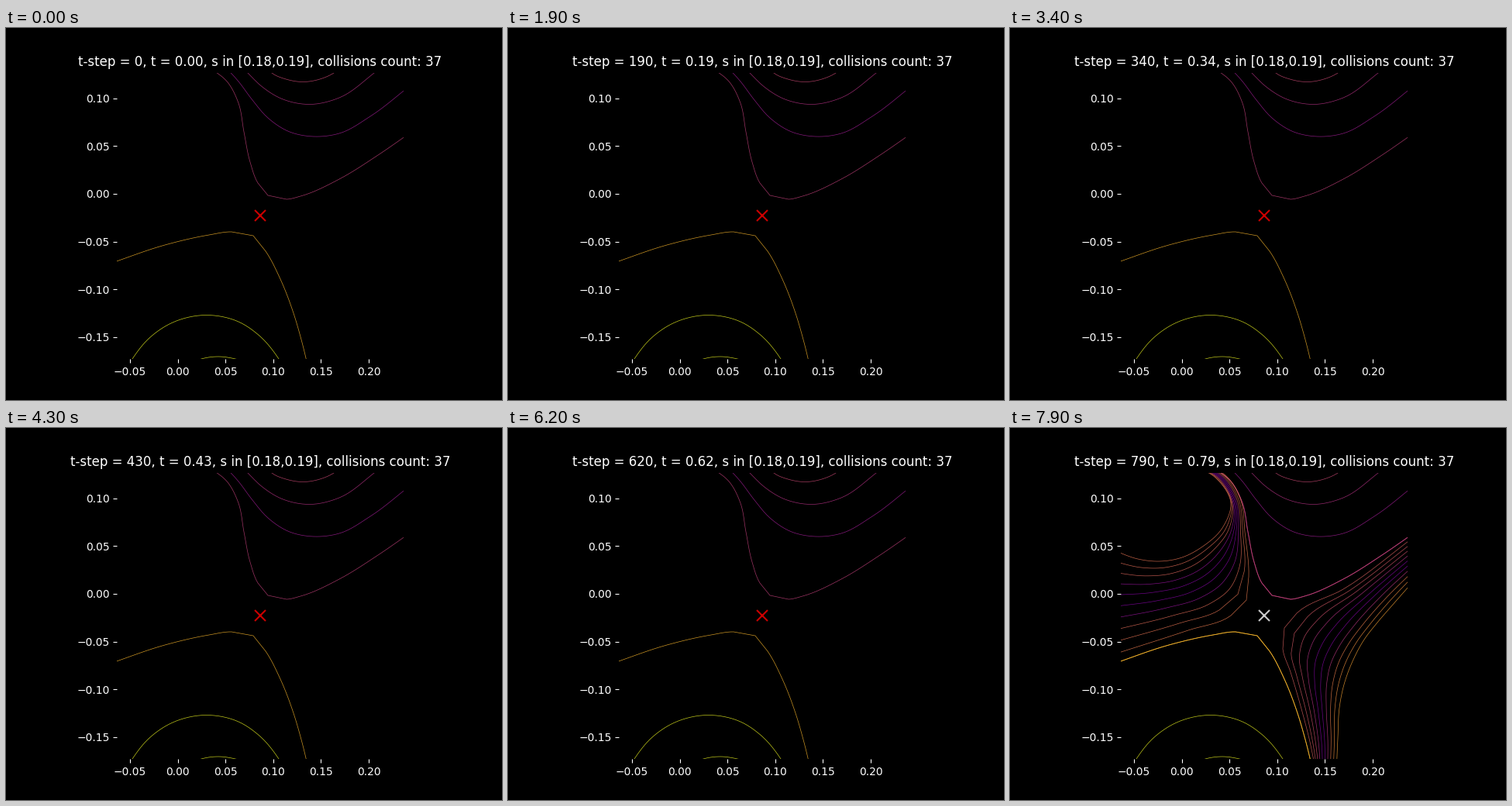
Animation of 640 by 480 pixels, one loop 8 s. Source, as a matplotlib script:

```python
import numpy as np
import matplotlib.pyplot as plt
from matplotlib.animation import FuncAnimation

FRAMES = 80
PASS, HIT = 70, 72    # steps at which bodies cross the front, then collide
SCALE = 1232          # pixels per data unit
CENTER = np.array([328, 242.4])
MID = (0.0864, -0.0231)
SUB = 8

plt.rcParams["font.family"] = "DejaVu Sans"
plt.style.use("dark_background")
plasma = plt.get_cmap("plasma")


def spline(pts, sharp=()):
    """Cubic Hermite curve through pts; segments listed in sharp stay straight."""
    pts = np.asarray(pts, float)
    chord = np.hypot(*np.diff(pts, axis=0).T)
    slope = np.gradient(pts, np.r_[0, np.cumsum(chord)], axis=0)
    q = np.linspace(0, 1, SUB, endpoint=False)[:, None]
    out = []
    for i, h in enumerate(chord):
        a, b = pts[i], pts[i + 1]
        if i in sharp:
            out.append(a + (b - a) * q)
        else:
            out.append((2*q**3 - 3*q**2 + 1) * a + (3*q**2 - 2*q**3) * b
                       + h * ((q**3 - 2*q**2 + q) * slope[i]
                              + (q**3 - q**2) * slope[i + 1]))
    return np.vstack(out + [pts[-1:]])


def to_data(p):
    return (p - CENTER) / (SCALE, -SCALE) + MID


class Body:
    """A dot running along a path, faster near the centre, with a trail."""

    def __init__(self, ax, pts, front, level, sharp=(), fixed=False, trail=True,
                 z=3.0):
        p = spline(pts, sharp)
        mid = (p[1:] + p[:-1]) / 2
        speed = 57 * (1 + 30 / np.hypot(*(mid - CENTER).T))
        t = np.r_[0, np.cumsum(np.hypot(*np.diff(p, axis=0).T) / speed)]
        self.t = t - t[front * SUB]
        self.p = to_data(p)
        style = dict(color=plasma(level), alpha=0.8)
        if fixed:
            ax.plot(*self.p.T, lw=0.5, zorder=2, **style)
        self.trail = None
        if trail:
            self.trail, = ax.plot([], [], lw=0.7 if fixed else 0.5, zorder=2,
                                  **style)
        self.dot, = ax.plot([], [], "o", ms=8.6, mew=0, zorder=z, **style)

    def move(self, now):
        pos = [np.interp(now, self.t, c) for c in self.p.T]
        inside = self.t[0] < now < self.t[-1]
        self.dot.set_data([pos[0]], [pos[1]])
        self.dot.set_visible(inside)
        if self.trail:
            done = self.p[self.t <= now]
            if inside:
                done = np.vstack([done, pos])
            self.trail.set_data(*done.T)


def blend(keys, u):
    """Quadratic blend of three curves at u = 0, 0.5 and 1."""
    w = ((1 - 2*u) * (1 - u), 4*u * (1 - u), u * (2*u - 1))
    return sum(k * np.array(c, float) for k, c in zip(w, keys))


fig, ax = plt.subplots(figsize=(6.4, 4.8), dpi=100)
ax.set_aspect("equal")
ax.set_xlim(MID[0] - 0.15, MID[0] + 0.15)
ax.set_ylim(MID[1] - 0.15, MID[1] + 0.15)
ax.set_xticks(np.arange(-1, 5) * 0.05)
ax.set_yticks(np.arange(-3, 3) * 0.05)
for axis in (ax.xaxis, ax.yaxis):
    axis.set_major_formatter(lambda v, _: f"{v:.2f}".replace("-", "\u2212"))
for side in ax.spines.values():
    side.set_visible(False)
title = ax.set_title("")
cross, = ax.plot(*MID, "x", ms=10, mew=1.5, alpha=0.8, zorder=9)

left = [
    [(236, 48), (265, 64), (285, 97), (274, 129), (247, 154), (222, 167),
     (193, 172), (165, 169), (134, 158)],
    [(246, 48), (274, 66), (290, 97), (290, 135), (280, 166), (259, 191),
     (228, 208), (190, 217), (134, 223)],
    [(256, 46), (281, 64), (298, 94), (303, 134), (308, 192), (305, 222),
     (285, 242), (230, 261), (134, 292)],
]
right = [
    [(395, 445), (387, 405), (377, 366), (362, 315), (352, 285), (354, 258),
     (370, 239), (430, 208), (522, 140)],
    [(405, 447), (404, 405), (400, 362), (397, 330), (399, 303), (409, 279),
     (428, 253), (466, 216), (522, 167)],
    [(421, 447), (423, 400), (425, 361), (431, 331), (442, 301), (457, 273),
     (474, 251), (493, 229), (522, 196)],
]
upper = [(258, 48), (286, 70), (300, 97), (307, 134), (315, 173), (325, 200),
         (338, 216), (362, 221), (380, 217), (430, 195), (480, 164), (522, 135)]
lower = [(392, 447), (381, 402), (371, 368), (354, 324), (335, 288), (319, 268),
         (291, 263), (262, 267), (205, 280), (134, 304)]
bowl_a = [(278, 45), (300, 69), (318, 93), (338, 116), (366, 134), (397, 140),
          (430, 136), (470, 114), (522, 74)]
bowl_b = [(300, 45), (312, 58), (332, 77), (355, 91), (392, 98.5), (430, 90),
          (475, 58), (490, 46)]
bowl_c = [(335, 50), (343, 58), (363, 66.5), (383, 69.5), (405, 66), (423, 58),
          (433, 50)]
hill_a = [(360, 440), (352, 427), (328, 398), (300, 379), (258, 370.5),
          (215, 380), (185, 400), (163, 427), (155, 440)]
hill_b = [(317, 438), (307, 430), (296, 427), (274, 424), (252, 427), (235, 434)]

bodies = [
    Body(ax, upper, 3, 0.48, sharp=(5, 6), fixed=True),
    Body(ax, lower, 2, 0.85, sharp=(4, 5), fixed=True, z=5),
    Body(ax, bowl_a, 3, 0.36, fixed=True, trail=False),
    Body(ax, bowl_b, 3, 0.43, fixed=True, trail=False),
    Body(ax, bowl_c, 2, 0.51, fixed=True, trail=False),
    Body(ax, hill_a, 2, 1.0, fixed=True, trail=False),
    Body(ax, hill_b, 1, 1.0, fixed=True, trail=False),
]
for u in np.linspace(0, 1, 10):
    z = 4 - abs(u - 0.5)
    tint = np.interp(u, [0, .3, .34, .66, .7, 1], [.66, .6, .27, .27, .62, .68])
    bodies.append(Body(ax, blend(left, u), 3, tint, z=z,
                       sharp=(4, 5) if u > 0.8 else ()))
    tint = np.interp(u, [0, .3, .4, .6, .75, 1], [.6, .52, .27, .27, .68, .8])
    bodies.append(Body(ax, blend(right, u), 2, tint, z=z,
                       sharp=(4, 5) if u < 0.2 else ()))


def update(n):
    title.set_text(f"t-step = {10 * n}, t = {n / 100:.2f}, "
                   "s in [0.18,0.19], collisions count: 37")
    cross.set_color("white" if n >= HIT else "red")
    for b in bodies:
        b.move(n - PASS)
    return []


anim = FuncAnimation(fig, update, frames=FRAMES, interval=100, repeat=True,
                     repeat_delay=0, blit=False)
plt.show()
```
